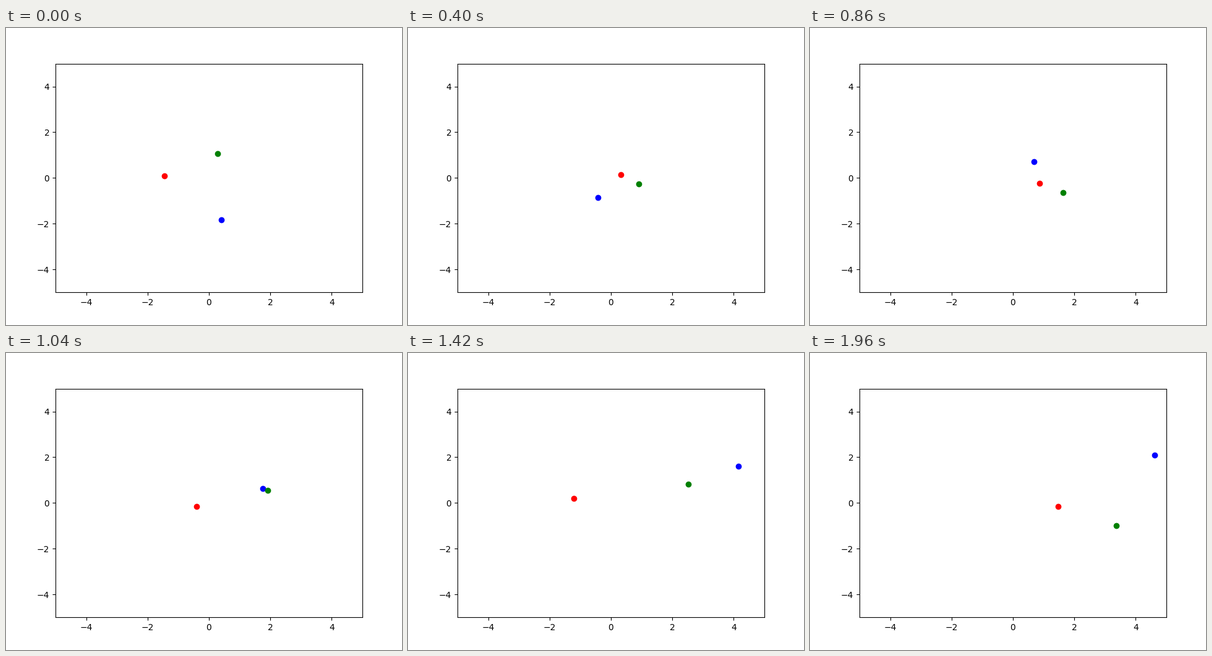
These frames come from a looping animation (640 px wide and 480 px high, 1980 ms). A matplotlib script:

```python
import numpy as np
import matplotlib.pyplot as plt
from matplotlib.animation import FuncAnimation

FRAMES = 99
STEP_MS = 20

# key points of the blue path, with a fast swing past green in the middle
KEYS = np.array([0, 20, 43, 52, 54, 71, 87, 98])
BLUE_X = np.array([0.403, -0.423, 0.685, 1.754, 2.205, 4.153, 4.577, 4.617])
BLUE_Y = np.array([-1.829, -0.855, 0.714, 0.633, 0.605, 1.607, 2.121, 2.094])


def smooth(n, values):
    """Cubic through the key points, slopes taken from their neighbours."""
    slopes = np.gradient(values, KEYS, edge_order=2)
    i = np.clip(np.searchsorted(KEYS, n, side="right") - 1, 0, len(KEYS) - 2)
    h = KEYS[i + 1] - KEYS[i]
    s = (n - KEYS[i]) / h
    return ((1 + 2 * s) * (1 - s) ** 2 * values[i]
            + s * (1 - s) ** 2 * h * slopes[i]
            + s * s * (3 - 2 * s) * values[i + 1]
            + s * s * (s - 1) * h * slopes[i + 1])


def red_pos(n):
    """Flat ellipse around the centre."""
    t = 0.1 * n
    return 0.002 + 1.487 * np.sin(t - 1.7786), 0.228 * np.cos(t - 1.2)


def green_pos(n):
    """Steady drift with a slightly flattened swing."""
    phase = 0.1052 * n - 0.33
    return 0.284 + 0.03148 * n, 1.16 * np.cos(phase) - 0.06 * np.cos(3 * phase)


def blue_pos(n):
    return smooth(n, BLUE_X), smooth(n, BLUE_Y)


fig, ax = plt.subplots(figsize=(6.4, 4.8), dpi=100)
ax.set_xlim(-5, 5)
ax.set_ylim(-5, 5)

bodies = [(ax.plot([], [], style)[0], pos)
          for style, pos in (("ro", red_pos), ("bo", blue_pos), ("go", green_pos))]


def update(n):
    for dot, pos in bodies:
        x, y = pos(n)
        dot.set_data([x], [y])
    return [dot for dot, _ in bodies]


anim = FuncAnimation(fig, update, frames=FRAMES, interval=STEP_MS, repeat=True)
plt.show()
```
